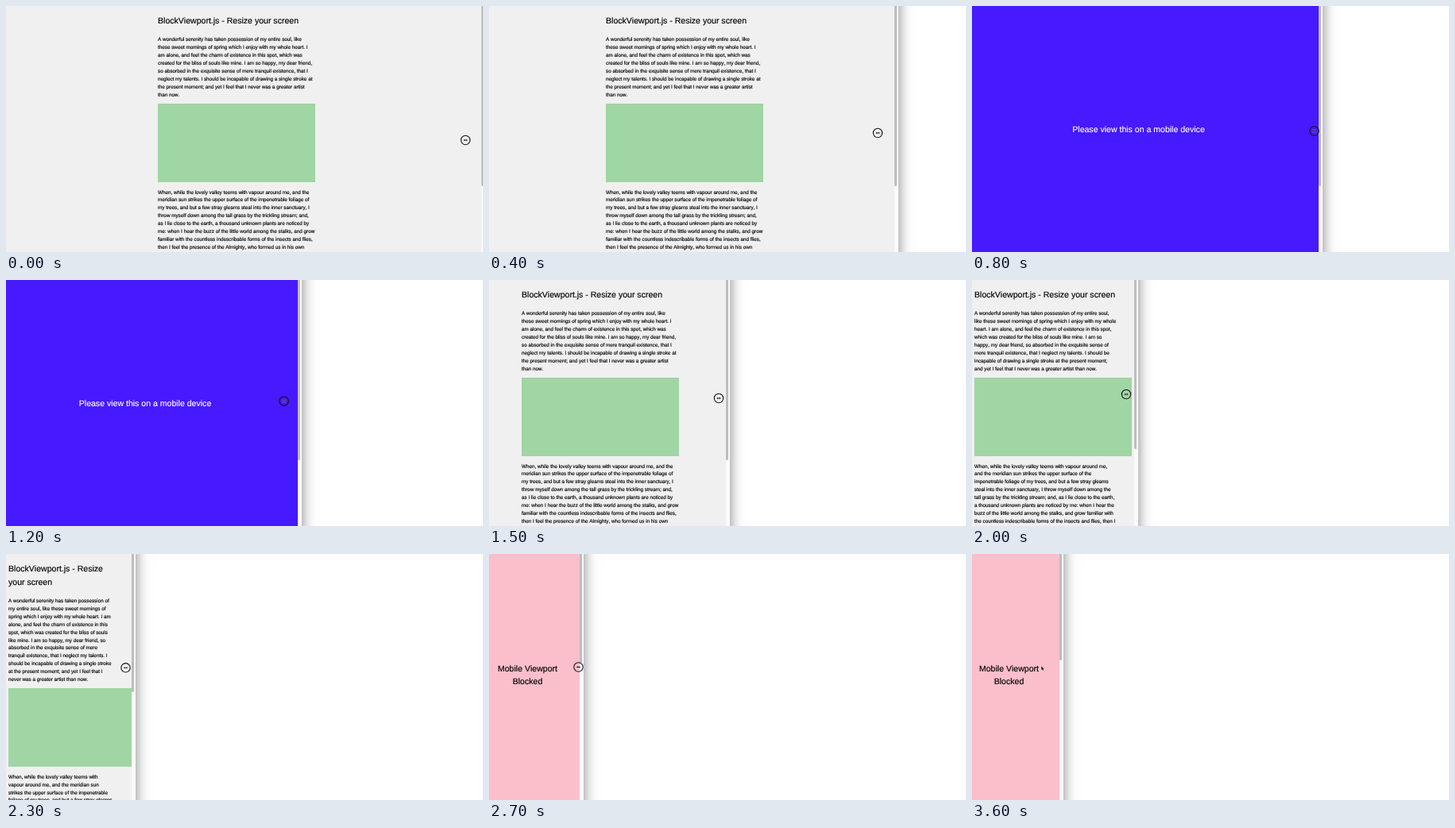
Write an HTML page that moves like this. It is 600 px wide and 310 px high and loops after 3700 ms.

```html
<!DOCTYPE html>
<html lang="en">
<head>
<meta charset="utf-8">
<title>BlockViewport.js</title>
<style>
html, body { margin: 0; width: 100%; height: 100%; overflow: hidden; background: #fff; }
body {
  position: relative;
  font: 6.32px/9.9px "Liberation Sans", Arial, sans-serif;
  font-kerning: none; text-rendering: geometricPrecision; color: #000;
  -webkit-text-stroke: .15px;
}
#win { position: absolute; left: -40px; top: -40px; height: 390px; background: #fafafa; box-shadow: 0 0 16px rgba(0, 0, 0, .5); }
#page { position: absolute; left: 0; top: 0; height: 310px; overflow: hidden; }
#content { position: absolute; top: 10.3px; }
h1, p { position: relative; top: 1px; margin: 0; }
h1 { margin-bottom: 10.7px; font-size: 10.55px; line-height: 16.5px; font-weight: 400; }
#box { width: 198px; height: 98.7px; margin: 6.3px 0 7.8px; background: #a0d5a4; }
#note { position: absolute; left: 0; font-size: 10.55px; line-height: 16.5px; text-align: center; transform: translateY(-50%); }
#thumb { position: absolute; top: 0; width: 3px; border-radius: 0 0 2px 2px; background: #bdbdbd; }
svg { position: absolute; left: 0; top: 0; }
</style>
</head>
<body>
<div id="win"></div>
<div id="page">
  <div id="content">
    <h1>BlockViewport.js - Resize your screen</h1>
    <p>A wonderful serenity has taken possession of my entire soul, like these sweet mornings of spring which I enjoy with my whole heart. I am alone, and feel the charm of existence in this spot, which was created for the bliss of souls like mine. I am so happy, my dear friend, so absorbed in the exquisite sense of mere tranquil existence, that I neglect my talents. I should be incapable of drawing a single stroke at the present moment; and yet I feel that I never was a greater artist than now.</p>
    <div id="box"></div>
    <p>When, while the lovely valley teems with vapour around me, and the meridian sun strikes the upper surface of the impenetrable foliage of my trees, and but a few stray gleams steal into the inner sanctuary, I throw myself down among the tall grass by the trickling stream; and, as I lie close to the earth, a thousand unknown plants are noticed by me: when I hear the buzz of the little world among the stalks, and grow familiar with the countless indescribable forms of the insects and flies, then I feel the presence of the Almighty, who formed us in his own image, and the breath of that universal love which bears and sustains us.</p>
  </div>
  <div id="note"></div>
</div>
<div id="thumb"></div>
<svg width="600" height="310">
  <g id="drag">
    <circle r="5.7" fill="none" stroke="#111" stroke-width="1.1"/>
    <path d="M-2.6 0l1.7-1.4v1h1.8v-1l1.7 1.4l-1.7 1.4v-1h-1.8v1z" fill="#222" stroke="#fff" stroke-width=".4" paint-order="stroke"/>
  </g>
  <path id="arrow" d="M87.3 141.2v5l1.1-.9l.8 1.7l.9-.4l-.8-1.7h1.5z" fill="#111" stroke="#fff" stroke-width=".5" paint-order="stroke"/>
</svg>
<script>
const LOOP = 3700, STEP = 100;
// [time, value] pairs, linear in between
const edge = [[0, 603], [400, 515], [600, 479], [800, 441], [1200, 372], [1500, 303], [1800, 247], [2000, 209], [2400, 147], [2700, 119], [2900, 115]];
const dragX = [[0, 578], [400, 489], [800, 430.5], [1500, 289], [2000, 194], [2400, 136], [2700, 112.5], [3000, 90], [3200, 87]];
const dragY = [[0, 169], [400, 160], [800, 157.5], [1500, 149], [2000, 144], [2700, 142.5], [3000, 142]];

const $ = id => document.getElementById(id);
const px = (id, prop, v) => $(id).style[prop] = v + 'px';

function at(keys, t) {
  const i = keys.findIndex(k => k[0] > t);
  if (i < 0) return keys[keys.length - 1][1];
  const [t0, a] = keys[i - 1], [t1, b] = keys[i];
  return a + (b - a) * (t - t0) / (t1 - t0);
}

function draw(now) {
  const t = Math.floor(now % LOOP / STEP) * STEP;
  const w = at(edge, t);
  const small = w < 130, wide = w > 305 && w < 476;
  const blocked = small || wide;

  px('win', 'width', w + 40);
  px('page', 'width', w - 5);
  $('page').style.background = small ? '#fbbfcb' : wide ? '#4619ff' : '#f0f0f0';

  $('content').style.display = blocked ? 'none' : 'block';
  px('content', 'left', Math.max(3, (w - 23) / 2 - 99));
  px('content', 'width', Math.min(197.8, w - 30));

  $('note').textContent = small ? 'Mobile Viewport Blocked' : wide ? 'Please view this on a mobile device' : '';
  $('note').style.color = small ? '#000' : '#fff';
  px('note', 'width', w - 22);
  px('note', 'top', small ? 152.5 : 155.5);

  px('thumb', 'left', w - 5);
  px('thumb', 'height', Math.min(227, 134 + (w - 115) * .84));

  const pressed = t < 3600;
  $('drag').style.display = pressed ? '' : 'none';
  $('arrow').style.display = pressed ? 'none' : '';
  $('drag').setAttribute('transform', `translate(${at(dragX, t)} ${at(dragY, t)})`);
}

function tick() {
  draw(performance.now());
  requestAnimationFrame(tick);
}
tick();
</script>
</body>
</html>
```
